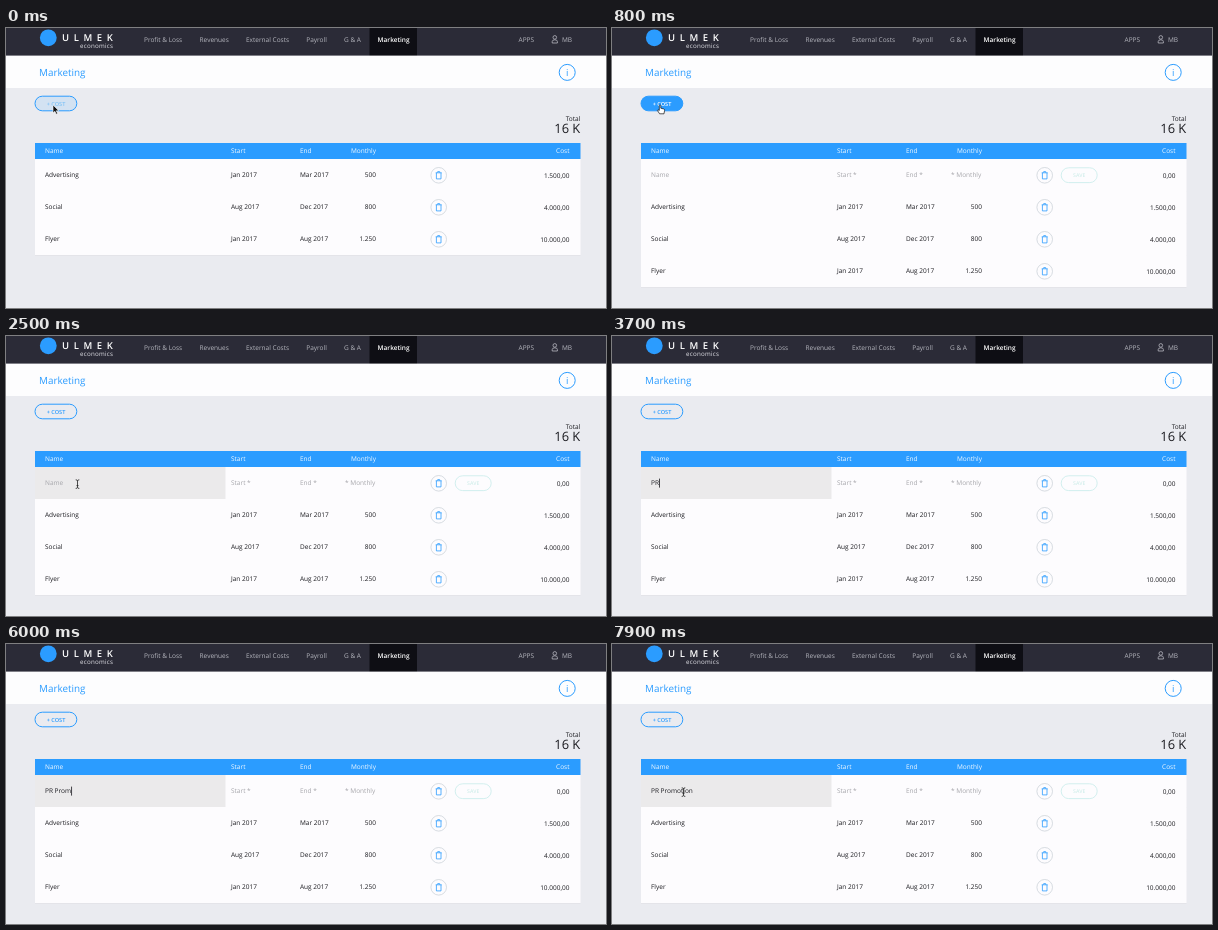
These frames come from a looping animation (600 by 280 pixels, 8 s). An HTML page:

```html
<!DOCTYPE html>
<html lang="en">
<head>
<meta charset="utf-8">
<title>Marketing costs</title>
<style>
  html, body { margin: 0; width: 100%; height: 100%; overflow: hidden; background: #eaebf0; }
  svg { display: block; width: 600px; height: 280px; }
  text { font: 6.5px "Open Sans", "Noto Sans", sans-serif; text-rendering: geometricPrecision; white-space: pre; }
  .r { text-anchor: end; }
  .m { text-anchor: middle; }
  .nav { fill: #b6b7bf; }
  .on { fill: #fff; font-weight: 600; }
  .head { fill: #f2f9ff; }
  .cell { fill: #1b1b20; }
  .hint { fill: #a6a6ab; }
  .line { fill: none; stroke: #2b9cff; }
  .small { font-size: 5.6px; font-weight: 600; }
</style>
</head>
<body>
<svg viewBox="0 0 600 280">
  <defs>
    <g id="bin">
      <circle r="7.8" fill="#fdfcfe" stroke="#cdd3da" stroke-width=".8"/>
      <path class="line" stroke-width=".8" d="M-3 -2.5H3M-2.3 -2.5V3.6H2.3V-2.5M-1 -2.7V-3.7H1V-2.7"/>
    </g>
  </defs>

  <rect width="600" height="280" fill="#eaebf0"/>
  <rect width="600" height="28" fill="#2b2b37"/>
  <rect x="363.5" width="47.5" height="28" fill="#0e0e14"/>
  <rect y="27.6" width="600" height="32.4" fill="#fdfdfe"/>

  <circle cx="42.3" cy="9.8" r="8.4" fill="#2b9cff"/>
  <text x="56" y="13.2" fill="#fff" style="font-size:9.5px;font-weight:600;letter-spacing:4.6px">ULMEK</text>
  <text x="74" y="20.3" fill="#e4e4ea" style="font-size:6.2px;letter-spacing:.25px">economics</text>
  <g id="nav"></g>
  <g fill="none" stroke="#b6b7bf" stroke-width=".8">
    <circle cx="548.8" cy="9.4" r="1.8"/>
    <path d="M546.2 15V13.6Q546.2 11.8 548.8 11.8T551.4 13.6V15Z"/>
  </g>

  <text x="33" y="48.2" fill="#2b9cff" style="font-size:9.9px">Marketing</text>
  <circle class="line" cx="561.2" cy="44.4" r="8"/>
  <text class="m" x="561.2" y="47.8" fill="#2b9cff" style="font-size:9.5px">i</text>

  <rect id="btn" class="line" x="29" y="68.2" width="41.8" height="14.6" rx="7.3"/>
  <text id="btnText" class="small m" x="50" y="77.6">+ COST</text>

  <text class="cell r" x="574.3" y="92.6">Total</text>
  <text class="cell r" x="574.3" y="104.8" style="font-size:12.9px">16 K</text>

  <rect x="29" y="115" width="545.5" height="16" fill="#2b9cff"/>
  <g id="heads"></g>

  <g id="entry">
    <rect x="29" y="131" width="545.5" height="32" fill="#fdfcfe"/>
    <rect id="hover" x="29" y="131" width="190.5" height="32" fill="#ebeaeb"/>
    <rect x="29" y="163" width="545.5" height=".8" fill="#e3e3e8"/>
    <text id="name" x="39" y="149.3"></text>
    <rect id="caret" y="142.6" width=".8" height="9" fill="#1b1b20"/>
    <text class="hint" x="225" y="149.3">Start *</text>
    <text class="hint" x="294" y="149.3">End *</text>
    <text class="hint r" x="369.3" y="149.3">* Monthly</text>
    <use href="#bin" x="432.7" y="147.3"/>
    <rect x="449.2" y="139.8" width="36" height="14.8" rx="7.4" fill="none" stroke="#cdeeed" stroke-width=".9"/>
    <text class="small m" x="467.2" y="149.2" fill="#d2eeeb" style="font-size:5.2px">SAVE</text>
    <text class="cell r" x="563.5" y="149.9">0,00</text>
  </g>
  <g id="rows"></g>

  <g id="cursor">
    <path id="arrow" d="M0 0V8L1.9 6.3 3.2 9.2 4.6 8.6 3.3 5.8H5.8Z" fill="#111" stroke="#fff" stroke-width=".6"/>
    <path id="hand" d="M-.7 .4Q0 -.6 .8 .4V3.2L3.9 4Q4.8 4.3 4.6 5.4L4 8.8H-.4L-2.6 5.4Q-2.6 4.2 -.7 5.4Z" fill="#fff" stroke="#111" stroke-width=".7"/>
    <path id="beam" d="M-1.8 -4.2Q0 -4.2 0 -3.2Q0 -4.2 1.8 -4.2M0 -3.2V3.4M-1.8 4.4Q0 4.4 0 3.4Q0 4.4 1.8 4.4M-1 1.6H1" fill="none" stroke="#222" stroke-width=".8"/>
  </g>
</svg>

<script>
const LOOP = 8000, STEP = 100, ADDED = 800, FOCUS = 2000;
const $ = id => document.getElementById(id);
const label = (x, y, cls, str) => `<text x="${x}" y="${y}" class="${cls}">${str}</text>`;

$('nav').innerHTML = [
  [138, 'Profit &amp; Loss'], [193.6, 'Revenues'], [240, 'External Costs'], [300.3, 'Payroll'],
  [338, 'G &amp; A'], [371.6, 'Marketing', 'on'], [512.6, 'APPS'], [556, 'MB']
].map(([x, str, on]) => label(x, on || x < 500 ? 13.8 : 14.3, on || 'nav', str)).join('');

// Name, start, end, monthly, cost
const columns = [[39, ''], [225, ''], [294, ''], [370, 'r'], [563.5, 'r']];
const line = (cells, y, cls) =>
  cells.map((str, i) => label(columns[i][0], y, `${cls} ${columns[i][1]}`, str)).join('');

$('heads').innerHTML = line(['Name', 'Start', 'End', 'Monthly', 'Cost'], 125.2, 'head');
$('rows').innerHTML = [
  ['Advertising', 'Jan 2017', 'Mar 2017', '500', '1.500,00'],
  ['Social', 'Aug 2017', 'Dec 2017', '800', '4.000,00'],
  ['Flyer', 'Jan 2017', 'Aug 2017', '1.250', '10.000,00']
].map((cells, i) => `<g transform="translate(0 ${131 + 32 * i})">
  <rect x="29" width="545.5" height="32" fill="#fdfcfe"/>
  <rect x="29" y="32" width="545.5" height=".8" fill="#e3e3e8"/>
  <use href="#bin" x="432.7" y="16.3"/>
  ${line(cells.slice(0, 4), 18.3, 'cell')}${label(563.5, 18.9, 'cell r', cells[4])}</g>`).join('');

const phrase = 'PR Promotion';
const keys = [3300, 3500, 4300, 4700, 5400, 5700, 6000, 6300, 6600, 6800, 7100, 7300];
const path = [[0, 47, 77], [100, 48, 77], [900, 48, 77], [1100, 50, 92], [1300, 56, 130],
  [1400, 58, 136.5], [1700, 71, 147], [2000, 71.5, 148], [LOOP, 71.5, 148]];

function cursorAt(t) {
  const i = Math.max(1, path.findIndex(p => p[0] > t));
  const [t0, x0, y0] = path[i - 1], [t1, x1, y1] = path[i];
  const k = (t - t0) / (t1 - t0);
  return [x0 + (x1 - x0) * k, y0 + (y1 - y0) * k];
}

const clamp = v => Math.min(1, Math.max(0, v));
const mix = (a, b, k) => `rgb(${a.map((v, i) => Math.round(v + (b[i] - v) * k))})`;
const show = (id, on) => $(id).style.display = on ? '' : 'none';
const blue = [43, 156, 255], page = [234, 235, 240], white = [255, 255, 255];

function draw(t) {
  // Button fades in on hover and out again
  const fill = Math.min(clamp((t + 30) / 250), clamp((1300 - t) / 200));
  $('btn').style.fill = mix(page, blue, fill);
  $('btnText').style.fill = t < 100 ? '#7fc2f6' : mix(blue, white, fill);

  show('entry', t >= ADDED);
  $('rows').setAttribute('transform', `translate(0 ${t >= ADDED ? 32 : 0})`);
  show('hover', t >= 1400);

  const count = keys.filter(k => k <= t).length;
  const name = $('name');
  name.textContent = count ? phrase.slice(0, count) : 'Name';
  name.setAttribute('class', count ? 'cell' : 'hint');

  const last = count ? keys[count - 1] : FOCUS;
  show('caret', t >= FOCUS && (t - last) % 1000 < 500);
  $('caret').setAttribute('x', 39.2 + (count ? name.getComputedTextLength() : 0));

  const [x, y] = cursorAt(t);
  $('cursor').setAttribute('transform', `translate(${x} ${y})`);
  show('cursor', t < keys[0] || t >= 7600);
  show('arrow', t < 100 || (t >= 1100 && t < 1600));
  show('hand', t >= 100 && t < 1100);
  show('beam', t >= 1600);
}

function tick() {
  draw(Math.floor(performance.now() % LOOP / STEP) * STEP);
  requestAnimationFrame(tick);
}
tick();
</script>
</body>
</html>
```
